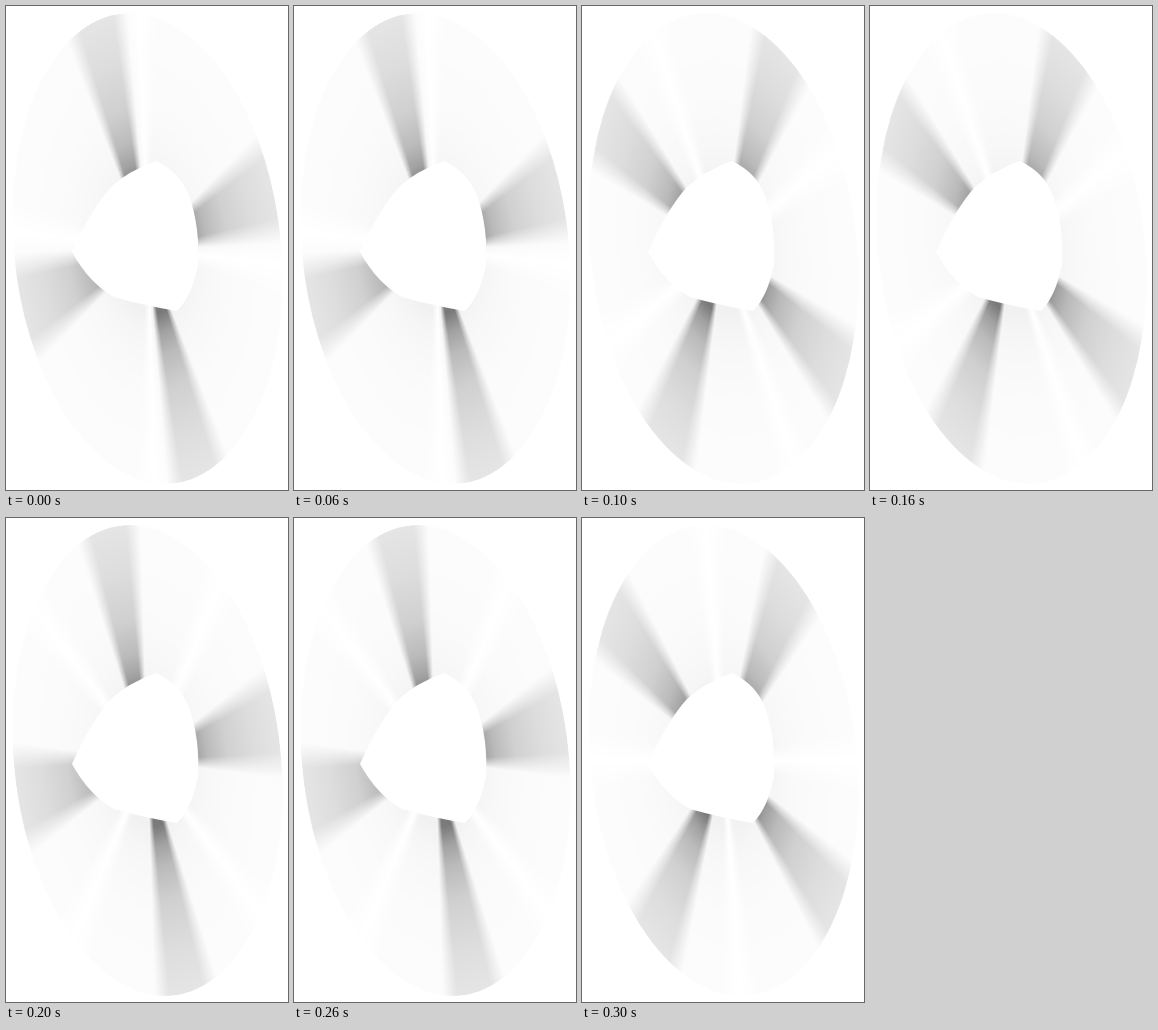
Recreate the animation shown at these times as an HTML page with a canvas. Size 282 by 484 pixels, loop 0.4 s.

```html
<!DOCTYPE html>
<html lang="en">
<head>
<meta charset="utf-8">
<title>Spinning propeller</title>
<style>
  html, body { margin: 0; width: 100%; height: 100%; overflow: hidden; background: #fff; }
  canvas { display: block; }
</style>
</head>
<body>
<canvas width="282" height="484"></canvas>
<script>
const ctx = document.querySelector('canvas').getContext('2d');
const STEP_MS = 100;
const FAINT = 0.1;

// Blade direction clockwise from the top, and the pale gap's distance after it, in degrees
const poses = [
  { blade: -15, gap: 19 },
  { blade: 33, gap: 33 },
  { blade: -9.5, gap: 50 },
  { blade: 39, gap: 51 }
];

const hub = new Path2D(`M66 246 Q85 203 105 181 Q122 165 150 155 Q175 167 183 190
  Q194 220 192 258 Q186 290 171 305 Q140 300 108 291 Q83 277 66 246Z`);

const black = alpha => `rgba(0,0,0,${alpha})`;

function bladeGradient({ blade, gap }) {
  const start = (blade - 14 - 90) * Math.PI / 180;
  const gradient = ctx.createConicGradient(start, 0, 0);
  const stops = [
    [-14, FAINT], [-7.5, 1], [7.5, 1], [14, FAINT],
    [Math.max(14, gap - 8), FAINT], [gap, 0], [gap + 8, FAINT], [76, FAINT]
  ];
  for (let turn = 0; turn < 4; turn++) {
    for (const [angle, alpha] of stops) {
      gradient.addColorStop((turn * 90 + angle + 14) / 360, black(alpha));
    }
  }
  return gradient;
}

function radialFade() {
  const gradient = ctx.createRadialGradient(0, 0, 0, 0, 0, 1);
  const stops = [[0.28, 0.52], [0.36, 0.37], [0.45, 0.27], [0.6, 0.185], [0.8, 0.135], [1, 0.1]];
  for (const [radius, alpha] of stops) gradient.addColorStop(radius, black(alpha));
  return gradient;
}

function fillDisc(style, mode) {
  ctx.globalCompositeOperation = mode;
  ctx.fillStyle = style;
  ctx.beginPath();
  ctx.arc(0, 0, 1, 0, Math.PI * 2);
  ctx.fill();
}

function draw(pose) {
  ctx.resetTransform();
  ctx.globalCompositeOperation = 'source-over';
  ctx.clearRect(0, 0, 282, 484);

  // The disc is a unit circle seen at a slant
  ctx.setTransform(134, 0, 17.5, 235.5, 141.5, 242.5);
  fillDisc(bladeGradient(pose), 'source-over');
  fillDisc(radialFade(), 'destination-in');

  ctx.resetTransform();
  ctx.globalCompositeOperation = 'destination-out';
  ctx.fillStyle = '#000';
  ctx.fill(hub);
}

const begin = performance.now();
function tick() {
  const elapsed = performance.now() - begin;
  draw(poses[Math.floor(elapsed / STEP_MS) % poses.length]);
  requestAnimationFrame(tick);
}
tick();
</script>
</body>
</html>
```
